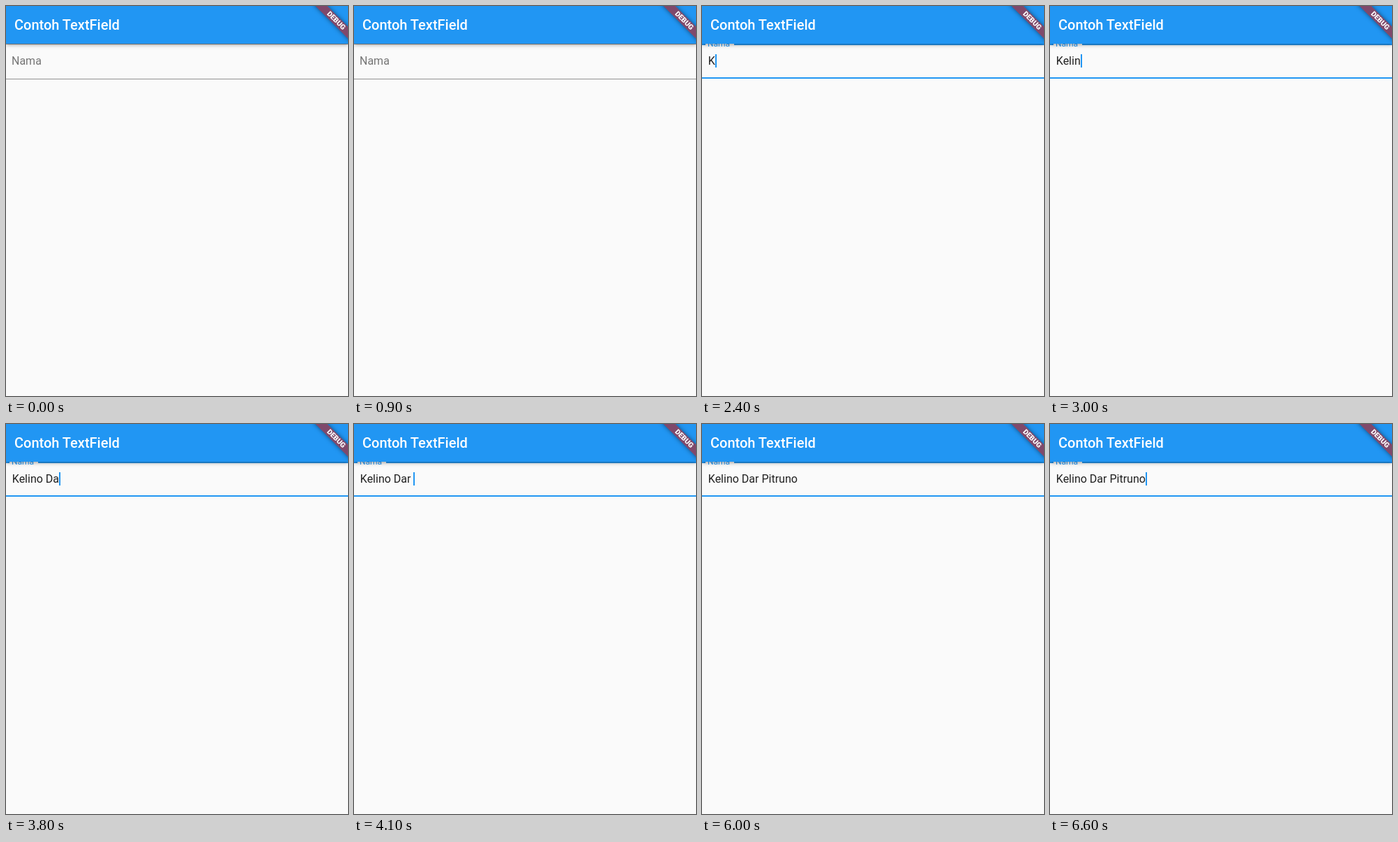
Animation, 490 px wide and 558 px high, one loop 6900 ms. Source, as an HTML page:

```html
<!DOCTYPE html>
<html lang="id">
<head>
<meta charset="utf-8">
<title>Contoh TextField</title>
<style>
  html, body { margin: 0; width: 100%; height: 100%; overflow: hidden; background: #fafafa; }
  #stage {
    position: absolute; left: 0; top: 0; width: 490px; height: 558px;
    overflow: hidden; background: #fafafa; font-family: Roboto, sans-serif;
  }
  #stage div { position: absolute; white-space: pre; }

  .bar {
    left: 0; top: 0; width: 490px; height: 54px; background: #2196f3;
    box-shadow: 0 2px 4px -1px rgba(0,0,0,.2), 0 3px 5px rgba(0,0,0,.12), 0 1px 8px rgba(0,0,0,.08);
  }
  .title { left: 12px; top: 0; font: 500 20px/54px Roboto, sans-serif; color: #fff; }

  .border { left: -3px; top: 54px; width: 500px; height: 49px; border: solid #919191; border-width: 1px 0; }
  .focused .border { height: 46px; border-color: #2196f3; border-width: 2px 0; }
  #gap { left: 5px; top: 54px; height: 2px; background: #fafafa; }

  #label { left: 8px; top: 54px; font-size: 16px; line-height: 50px; color: #757575; transform-origin: 0 50%; }
  .focused #label { color: #2196f3; }

  #input { left: 8.8px; top: 53.5px; height: 50px; font-size: 16px; line-height: 50px; color: #212121; }
  #caret { left: 100%; top: 15.5px; width: 2px; height: 19px; background: #2196f3; }

  /* Corner ribbon, turned about the screen's own top right corner */
  .ribbon {
    left: 457px; top: 25px; width: 80px; height: 12px;
    transform-origin: 40px -28px; transform: rotate(45deg);
    background: rgba(183,28,28,.627); box-shadow: 0 0 6px rgba(0,0,0,.5);
    color: #fff; font: 900 10.2px/12px Roboto, sans-serif; text-align: center;
  }
</style>
</head>
<body>
<div id="stage">
  <div class="border"></div>
  <div id="gap"></div>
  <div id="label">Nama</div>
  <div id="input"><span id="typed"></span><div id="caret"></div></div>
  <div class="bar"></div>
  <div class="title">Contoh TextField</div>
  <div class="ribbon">DEBUG</div>
</div>
<script>
  const LOOP = 6900, TICK = 100, FOCUS = 1000, BLINK = 500;
  const NAME = "Kelino Dar Pitruno";
  // Moment at which each character is typed
  const KEYS = [2400, 2600, 2700, 2900, 3000, 3200, 3300, 3600, 3800,
                3900, 4100, 4600, 4800, 4900, 5100, 5300, 5400, 5500];
  const $ = id => document.getElementById(id);
  const stage = $("stage"), label = $("label"), gap = $("gap"),
        typed = $("typed"), caret = $("caret");

  const ease = x => x * x * (3 - 2 * x);

  function render(ms) {
    const t = Math.floor(ms % LOOP / TICK) * TICK;
    const focused = t >= FOCUS;
    const lift = ease(Math.min(1, Math.max(0, (t - FOCUS + 50) / 167))) * focused;

    stage.classList.toggle("focused", focused);
    label.style.transform = `translateY(${-24.5 * lift}px) scale(${1 - 0.25 * lift})`;
    gap.style.width = 41 * lift + "px";

    const count = KEYS.filter(k => k <= t).length;
    typed.textContent = NAME.slice(0, count);

    // Each key press restarts the blink
    const since = t - (count ? KEYS[count - 1] : FOCUS);
    const lit = count ? since % (2 * BLINK) < BLINK : since < BLINK || t >= 1900;
    caret.style.visibility = focused && lit ? "visible" : "hidden";
  }

  const start = performance.now();
  function loop() {
    render(performance.now() - start);
    requestAnimationFrame(loop);
  }
  loop();
</script>
</body>
</html>
```
